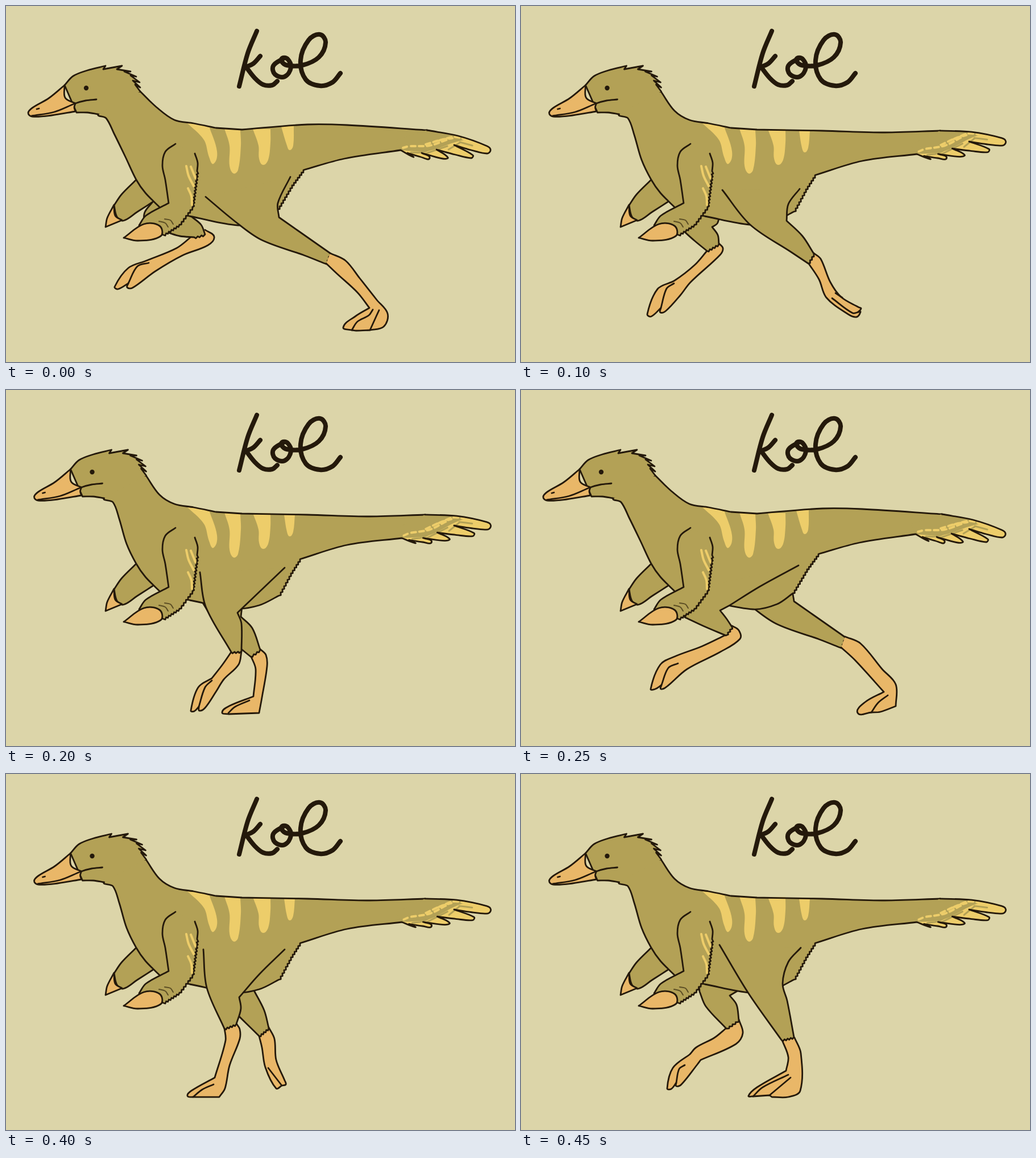
These frames come from a looping animation (895 px wide and 625 px high, 500 ms). An HTML page:

```html
<!DOCTYPE html>
<html lang="en">
<head>
<meta charset="utf-8">
<title>Running dinosaur</title>
<style>
  html, body { margin: 0; width: 100%; height: 100%; overflow: hidden; background: #dcd5a9; }
  svg { display: block; width: 895px; height: 625px; }
  path { stroke-linecap: round; stroke-linejoin: round; }
</style>
</head>
<body>
<svg id="stage" viewBox="0 0 895 625"></svg>
<script>
const INK = '#24190b', OLIVE = '#b3a156', YELLOW = '#edcd6a', ORANGE = '#e9b768';

// Feathered edge from a to b; side 1 puts the tips right of the direction of travel.
function feathered(a, b, side) {
  const dx = b.x - a.x, dy = b.y - a.y, len = Math.hypot(dx, dy);
  const teeth = Math.max(3, Math.round(len / 6)), out = 2.5 * side / len;
  let d = '';
  for (let i = 0; i < teeth; i++) {
    const tip = (i + 0.35) / teeth, end = (i + 1) / teeth;
    d += `L${a.x + dx * tip - dy * out} ${a.y + dy * tip + dx * out}L${a.x + dx * end} ${a.y + dy * end}`;
  }
  return d;
}

// Smooth line through points "x,y". "!" after a point makes a corner,
// "~" or "^" before it a feathered edge with tips on the right or left.
function trace(text) {
  const points = text.trim().split(/\s+/).map(word => {
    const [x, y] = word.match(/\d+/g).map(Number);
    return { x, y, corner: word.endsWith('!'), side: { '~': 1, '^': -1 }[word[0]] };
  });
  points.forEach((p, i) => { if (p.side) p.corner = points[i - 1].corner = true; });
  let d = `M${points[0].x} ${points[0].y}`;
  for (let i = 1; i < points.length; i++) {
    const a = points[i - 1], b = points[i];
    if (b.side) { d += feathered(a, b, b.side); continue; }
    const before = a.corner ? a : points[i - 2] || a;
    const after = b.corner ? b : points[i + 1] || b;
    const reach = Math.hypot(b.x - a.x, b.y - a.y) / 3;
    const handle = (p, from, to, sign) => {
      const k = sign * reach / Math.hypot(to.x - from.x, to.y - from.y);
      return `${p.x + (to.x - from.x) * k} ${p.y + (to.y - from.y) * k}`;
    };
    d += `C${handle(a, before, b, 1)} ${handle(b, a, after, -1)} ${b.x} ${b.y}`;
  }
  return d;
}

const shape = (text, fill = 'none', stroke = INK, width = 2.8) =>
  `<path d="${trace(text)}" fill="${fill}" stroke="${stroke}" stroke-width="${width}"/>`;
const patch = (text, fill) => shape(text, fill, 'none');
const lines = (stroke, width, ...texts) => texts.map(text => shape(text, 'none', stroke, width)).join('');
const move = (transform, content) => `<g transform="${transform}">${content}</g>`;

const foot = (outline, ...toes) => shape(outline, ORANGE) + lines(INK, 2.8, ...toes);
const thigh = outline => shape(outline, OLIVE);

// Thighs and feet, named by the phase of the stride
const kickThigh = thigh('351,335 400,376 448,410 525,438 563,453 ~570,434 520,399 480,371! 478,346 500,300');
const kickNear = kickThigh + foot(
  '563,452 582,470 618,503 639,530! 614,545 593,564 608,569! 616,570 640,569! 664,563 671,540 652,516 622,478 597,447 570,434',
  '608,569 618,554 638,543 645,533', '640,569 650,547 656,534');
const kickFar = kickThigh + foot(
  '563,452 588,475 638,530! 605,548 592,567 616,566! 632,565 659,555! 659,517 635,490 597,445 570,433',
  '616,566 628,549 645,536');

const tuckFar = foot(
  '326,405 300,425 247,447 215,460 191,493 197,497 215,487! 213,494 222,495 262,466 310,438 355,420 366,405 350,393',
  '215,487 231,457 251,451') +
  thigh('258,344 244,362 242,380! 285,398! 306,404 331,406 ~350,401 343,384 325,369');
const tuckNear = foot(
  '360,430 318,450 270,468 245,482 228,525 236,525 247,518! 246,525 256,521 292,490 350,460 385,437 383,422 371,414',
  '247,518 259,488 276,480') +
  thigh('488,308 420,345 367,378! 350,387! 361,401 371,416 ^360,431 320,414 288,399! 300,350!');

const reachFar = foot(
  '327,430 305,455 270,482 240,497 222,541 229,545 246,530! 245,538 255,535 280,508 298,485 350,437 355,425 347,416',
  '246,530 256,496 269,487') +
  thigh('300,360! 287,396! 305,412 327,430 ~348,418 346,402 336,388! 345,382 348,373');
const reach = foot(
  '361,446 340,463 308,480 297,492! 267,516 257,552 264,553 273,542! 273,548 282,545 310,510 316,502! 378,474 390,455 383,431',
  '273,542 278,518 288,511') +
  thigh('489,310 430,351 367,389! 379,405 383,432 ^361,447 325,408 314,382! 310,345!');

const liftNear = foot(
  '505,451 524,480 537,512 575,541 590,546 597,537 593,537! 598,531 594,529 563,511 544,485 527,444 515,434',
  '547,513 583,539 594,537', '553,504 565,512') +
  thigh('354,323 403,384 475,432 505,452 ~515,435 495,404 467,377! 470,348 490,321');
const liftFar = foot(
  '480,451 504,480 538,520 580,558 592,561 590,551 580,545! 595,543 590,535 563,520 541,503 514,455 494,435',
  '544,530 560,539 580,545') +
  thigh('399,380 423,408 480,452 ~494,435 475,402 457,383! 460,370');

const trail = foot(
  '445,460 450,480 456,515 475,552 485,547! 492,545 490,538 475,502 472,465 462,445', '461,516 485,547') +
  thigh('346,322 358,358 378,392 445,460 ~462,446 454,415 436,380! 455,346 490,315');

const landFoot = foot(
  '361,446 363,468 344,533! 303,556 296,565 306,567 352,567! 362,552 370,512 388,465 388,448 382,438',
  '306,567 322,554 342,545');
const landFar = landFoot + thigh('318,350! 322,385! 340,415 360,445 ~382,438 380,407 368,388! 378,370');
const landNear = move('translate(23)', landFoot) +
  thigh('347,308 353,375 384,447 ~405,439 413,412 410,392! 445,352 490,308');

const standFar = foot(
  '431,468 439,490 435,538! 392,555 380,566 391,569! 445,567! 450,540 459,485 457,465 447,455',
  '391,567 403,556 428,545') +
  thigh('345,372! 362,400! 414,455! 430,468 ~447,456 433,418 413,398! 415,380');
const standNear = foot(
  '459,467 470,497 466,521! 415,550 400,565 408,566! 437,564! 441,567! 470,567 491,556 492,490 481,463',
  '408,566 425,550 470,528', '437,564 474,533') +
  thigh('349,300 400,385 458,467 ~480,462 468,398 460,368 470,330 492,305');

const passNear = foot(
  '396,460 380,483 362,506! 338,522 325,563 331,564 339,556! 340,563 350,558 369,530 383,508 409,482 414,459',
  '339,556 350,522 362,510') +
  thigh('341,320 351,380 396,460 ~414,459 414,410 407,391! 490,312');

// Upper body
const shoulder = ' 415,217! 369,214! 330,206 296,200 ';
const chest = ' 229,305 245,328 272,355! 323,369! ';
const leapBody = '740,218 600,209 530,208' + shoulder + '265,178 236,150! 200,152! 162,190 176,197 190,224 210,265' +
  chest + '408,385 450,376 478,357 ~503,315 ~523,288 595,268 694,253';
const strideBody = '737,219 640,222 530,219' + shoulder + '270,184 246,150! 210,152! 172,190 188,197 199,226 212,270' +
  chest + '403,384 445,378 480,361 ~501,322 ~517,297 600,272 696,260';

const stripes = patch('317,204! 348,235 357,265 365,277 371,255 357,211!', YELLOW) +
  patch('384,215! 393,245 393,280 400,294 408,288 413,245 412,217!', YELLOW) +
  patch('434,216! 444,245 445,268 452,279 461,270 465,240 465,216!', YELLOW);
const leapStripe = patch('484,212! 494,245 499,253 505,245 506,210!', YELLOW);
const strideStripe = patch('489,219! 494,249 499,257 505,249 508,219!', YELLOW);

const feathers = `846,246 852,253 846,259 818,253 788,244! 821,262 818,267 790,261 757,252!
  777,266 768,268 731,258! 745,267 729,265 706,258! 716,265 694,253!`;
const tailEdge = '740,218 795,228 ' + feathers;
const tailTip = patch(tailEdge + ' 685,235!', OLIVE) + patch(feathers + ' 740,255 790,239 812,234', YELLOW) +
  `<g stroke-dasharray="8 6">${lines(YELLOW, 4, '698,249 705,247', '712,246 745,245 775,235',
    '738,243 765,235 785,232', '762,236 790,230 822,240')}</g>` +
  lines(OLIVE, 3, '712,257 730,257 750,250', '735,260 776,246', '778,252 798,240', '798,239 820,245') +
  shape(tailEdge);

const head = shape(`162,190 143,187 124,187! 103,139! 118,123 143,113 175,105! 171,111! 204,105! 195,111!
    219,115! 208,115! 229,124! 219,122! 235,134! 223,131! 236,143! 227,138! 236,150!`, OLIVE) +
  shape('103,139! 75,162 46,179 39,188 46,194 80,192 122,185! 120,178 122,171! 104,161 103,139!', ORANGE) +
  lines(INK, 2.8, '45,193 85,186 122,171 140,166 159,164', '54,181 58,180') +
  `<circle cx="141" cy="144" r="4.2" fill="${INK}"/>`;

const farArm = shape('229,305 203,331 190,350! 195,370 206,377 230,362 258,344', OLIVE) +
  shape('190,349! 178,372 175,388! 204,376! 192,368 190,349!', ORANGE);
const nearArm = shape(`298,242 280,256 275,280 280,305 286,346! 246,368 234,385!
    277,402 ~305,384 ~328,353 ~336,290 337,275 332,259`, OLIVE) +
  lines(YELLOW, 4, '317,281 321,298 330,316', '325,282 333,302', '320,320 326,334 327,349') +
  lines('#5b4d24', 2, '279,374 289,376 294,383', '269,378 280,381 285,388') +
  shape('207,407! 242,383 270,386 272,404 232,412 207,407!', ORANGE);

const lettering = lines(INK, 8, '441,44 425,83 410,141', '447,88 435,101 422,107! 437,126 452,138 468,139 477,132',
  `488,92 470,105 473,120 490,124 501,108 496,94 487,91 484,96 494,104 521,104
   550,90 562,64 552,50 532,60 518,95 527,129 552,140 574,134 588,118`);

const torso = (outline, lastStripe) => patch(outline, OLIVE) + stripes + lastStripe + shape(outline);
const pose = (ms, torsoArt, tailArt, headArt, far, near) =>
  ({ ms, art: `<g display="none">${farArm + far + torsoArt + tailArt + headArt + near + nearArm}</g>` });
const leaping = (far, near) => pose(100, torso(leapBody, leapStripe), tailTip, head, far, near);
const striding = (far, near) => pose(50, torso(strideBody, strideStripe),
  move('translate(2 7) rotate(-8 694 253)', tailTip), move('translate(10.5)', head), far, near);

const poses = [
  leaping(tuckFar, kickNear),
  striding(reachFar, liftNear),
  striding(landFar, trail),
  striding(standFar, passNear),
  leaping(kickFar, tuckNear),
  striding(liftFar, reach),
  striding(trail, landNear),
  striding(reach, standNear)
];

const stage = document.getElementById('stage');
stage.innerHTML = `<g>${lettering}</g>` + poses.map(p => p.art).join('');
const drawings = [...stage.children].slice(1);
const loop = poses.reduce((sum, p) => sum + p.ms, 0);

let shown = drawings[0];
function draw(now) {
  let t = now % loop, i = 0;
  while (t >= poses[i].ms) t -= poses[i++].ms;
  shown.setAttribute('display', 'none');
  shown = drawings[i];
  shown.setAttribute('display', 'inline');
}

const start = performance.now();
function tick() {
  draw(Math.max(0, performance.now() - start));
  requestAnimationFrame(tick);
}
tick();
</script>
</body>
</html>
```
